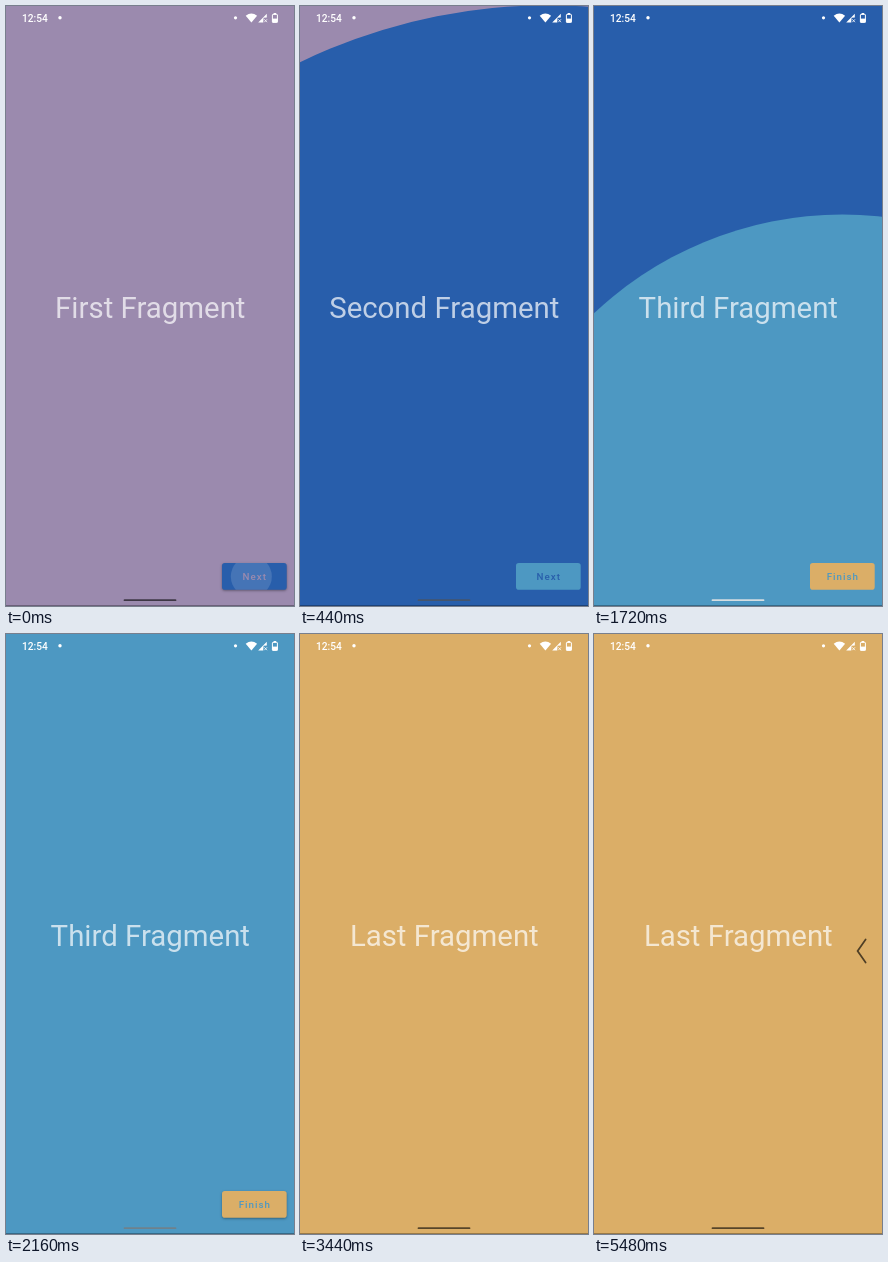
Animation of 288x600 px, one loop 5520 ms. Source, as an HTML page with a canvas:

```html
<!DOCTYPE html>
<html lang="en">
<head>
<meta charset="utf-8">
<title>Circular reveal</title>
<style>
  html, body { margin: 0; width: 100%; height: 100%; overflow: hidden; background: #9b8aae; }
  canvas { display: block; width: 288px; height: 600px; }
</style>
</head>
<body>
<canvas id="stage"></canvas>
<script>
const W = 288, H = 600, LOOP = 5520;
const FONT = 'Roboto, "Open Sans", sans-serif';
const PURPLE = '#9b8aae', BLUE = '#285eab', SKY = '#4d98c2', SAND = '#dbae67';
const BTN = { x: 216, y: 557, w: 64.7, h: 26.7, r: 2.8 };
const CORNER = { x: 248.3, y: 570.3 };
const REACH = Math.hypot(W, H);

// start: when the page begins to open; from: centre of the reveal
const pages = [
  { title: 'First Fragment', bg: PURPLE, label: 'Next', btn: BLUE, start: -2000, from: CORNER },
  { title: 'Second Fragment', bg: BLUE, label: 'Next', btn: SKY, start: 55, from: CORNER },
  { title: 'Third Fragment', bg: SKY, label: 'Finish', btn: SAND, start: 1543, from: CORNER },
  { title: 'Last Fragment', bg: SAND, start: 2920.5, from: { x: 144, y: 300 } }
];

const canvas = document.getElementById('stage');
const ctx = canvas.getContext('2d');
const dpr = window.devicePixelRatio || 1;
canvas.width = W * dpr;
canvas.height = H * dpr;

const clamp = v => Math.min(1, Math.max(0, v));
const mix = (a, b, k) => a + (b - a) * k;
const easeOut = (p, n) => 1 - Math.pow(1 - clamp(p), n);

function disc(x, y, r, fill) {
  ctx.beginPath();
  ctx.arc(x, y, r, 0, Math.PI * 2);
  if (fill) {
    ctx.fillStyle = fill;
    ctx.fill();
  }
}

function roundRect(x, y, w, h, r) {
  ctx.beginPath();
  ctx.roundRect(x, y, w, h, r);
}

function poly(...pts) {
  ctx.beginPath();
  pts.forEach(([x, y]) => ctx.lineTo(x, y));
}

function text(str, x, y, font, fill, align, spacing = 0) {
  ctx.font = font + ' ' + FONT;
  ctx.textAlign = align;
  ctx.letterSpacing = spacing + 'px';
  ctx.fillStyle = fill;
  ctx.fillText(str, x, y);
}

function drawButton(page, age, pressAge) {
  ctx.save();
  ctx.shadowColor = `rgba(0,0,0,${0.38 * clamp((age - 400) / 200)})`;
  ctx.shadowBlur = 2.5 * dpr;
  ctx.shadowOffsetY = 1.1 * dpr;
  roundRect(BTN.x, BTN.y, BTN.w, BTN.h, BTN.r);
  ctx.fillStyle = page.btn;
  ctx.fill();
  ctx.restore();

  if (pressAge > 0) {
    ctx.save();
    roundRect(BTN.x, BTN.y, BTN.w, BTN.h, BTN.r);
    ctx.clip();
    const k = clamp((pressAge - 65) / 95);
    const r = Math.min(35, 18.8 + pressAge * 0.0263);
    disc(mix(245.3, 248, k), 570.5, r, `rgba(255,255,255,${0.15 * clamp(pressAge / 75)})`);
    ctx.restore();
  }
  text(page.label, 248.8, 574, '500 9.8px', page.bg, 'center', 1);
}

function drawPage(i, t) {
  const page = pages[i], age = t - page.start;
  if (age <= 0) return;
  ctx.save();
  if (age < 1000) {
    disc(page.from.x, page.from.y, REACH * easeOut(age / 1000, 4));
    ctx.clip();
  }
  ctx.fillStyle = page.bg;
  ctx.fillRect(0, 0, W, H);
  text(page.title, 144.3, 311.6, '400 29.4px', 'rgba(255,255,255,.7)', 'center');
  if (page.label) drawButton(page, age, t - pages[i + 1].start + 120);
  ctx.restore();
}

function drawStatus() {
  const white = '#fff';
  text('12:54', 16, 15.7, '500 10.2px', white, 'left');
  disc(54, 11.8, 1.7, white);
  disc(229.5, 11.8, 1.6, white);

  // wifi
  ctx.beginPath();
  ctx.moveTo(245.4, 16.6);
  ctx.lineTo(239.7, 9.8);
  ctx.quadraticCurveTo(245.4, 5.4, 251.1, 9.8);
  ctx.closePath();
  ctx.fill();

  // signal
  poly([252.2, 16.4], [260.8, 7.8], [260.8, 11.6], [257.6, 11.8], [257.2, 16.4]);
  ctx.fill();
  ctx.strokeStyle = white;
  ctx.lineWidth = 0.8;
  ctx.lineCap = 'butt';
  poly([258.3, 13.3], [261, 16.2]);
  ctx.stroke();
  poly([261, 13.3], [258.3, 16.2]);
  ctx.stroke();

  // battery
  ctx.fillRect(267.6, 7, 2.6, 1.4);
  ctx.fillRect(266.2, 12.6, 5.4, 3.8);
  ctx.lineWidth = 1;
  roundRect(266.4, 8.4, 5, 8, 0.6);
  ctx.stroke();
}

function drawNav(t) {
  // 1 is a light handle, 0 a dark one
  const light = easeOut((t - 140) / 1700, 2) * (1 - easeOut((t - 1640) / 1700, 2));
  const g = Math.round(255 * light);
  ctx.fillStyle = `rgba(${g},${g},${g},${mix(0.6, 0.92, light)})`;
  roundRect(117.6, 593.3, 52.8, 1.8, 0.9);
  ctx.fill();
  ctx.fillStyle = 'rgba(0,0,0,.3)';
  ctx.fillRect(0, 599, W, 1);
}

function drawBackArrow(t) {
  const age = t - 4480;
  if (age < 0) return;
  const slide = easeOut(age / 520, 2);
  const open = easeOut((age - 100) / 360, 2);
  const angle = mix(90, 55, open) * Math.PI / 180;
  const dx = 14 * Math.cos(angle), dy = 14 * Math.sin(angle);
  const x = mix(288, 263.6, slide), y = 317;
  ctx.strokeStyle = `rgba(0,0,0,${0.64 * clamp(age / 120)})`;
  ctx.lineWidth = 1.75;
  ctx.lineCap = 'round';
  ctx.lineJoin = 'miter';
  poly([x + dx, y - dy], [x, y], [x + dx, y + dy]);
  ctx.stroke();
}

function draw() {
  const t = performance.now() % LOOP;
  ctx.setTransform(dpr, 0, 0, dpr, 0, 0);
  pages.forEach((_, i) => drawPage(i, t));
  drawStatus();
  drawNav(t);
  drawBackArrow(t);
  requestAnimationFrame(draw);
}
draw();
</script>
</body>
</html>
```
